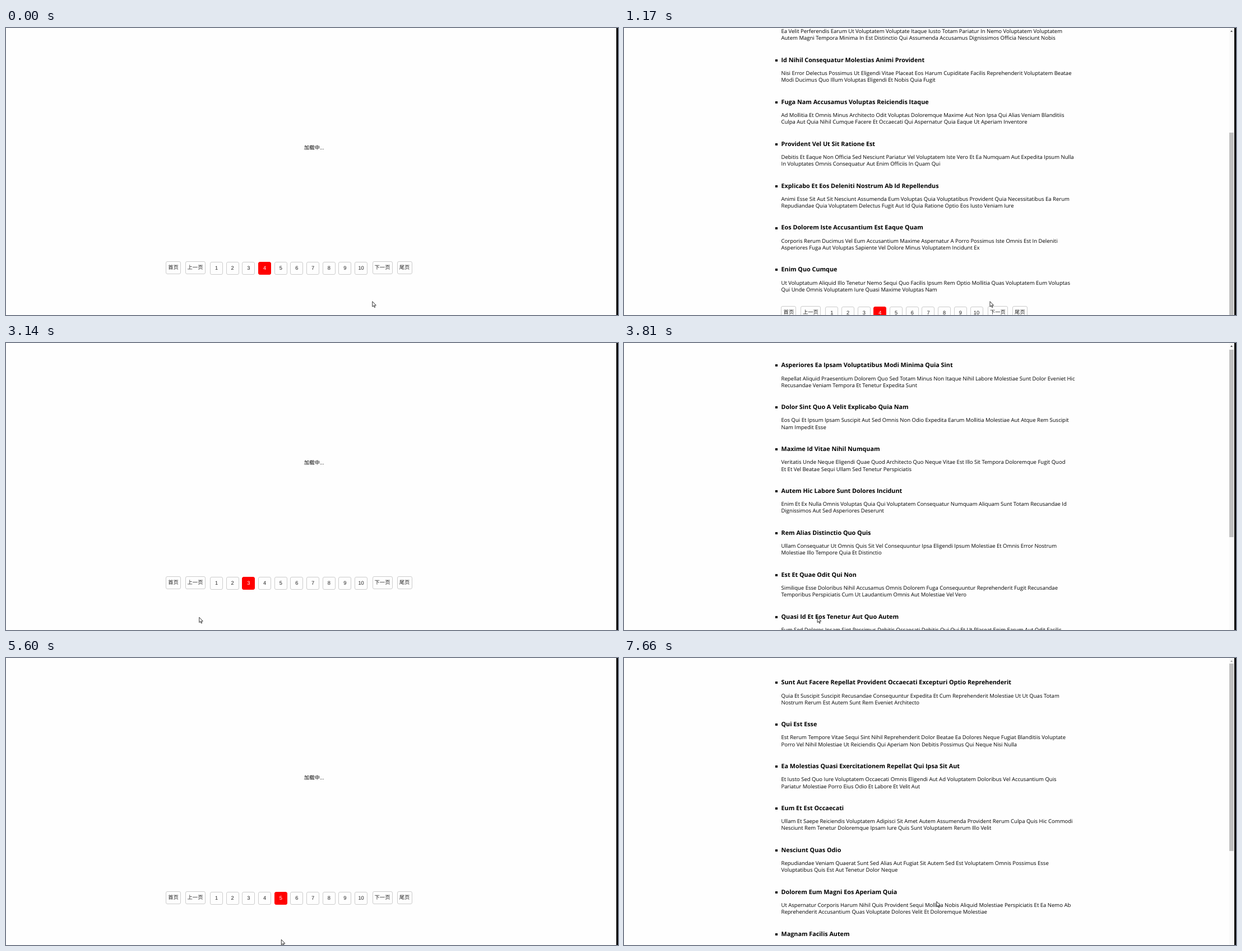
Recreate the animation shown at these times as an HTML page. Size 1092 px wide and 513 px high, loop 8000 ms.

```html
<!DOCTYPE html>
<html lang="zh">
<head>
<meta charset="utf-8">
<title>分页</title>
<style>
html, body { margin: 0; width: 100%; height: 100%; overflow: hidden; background: #fefefe; }
#stage { position: relative; width: 1092px; height: 513px; overflow: hidden; text-rendering: geometricPrecision; }
#stage div, #stage svg { position: absolute; white-space: nowrap; }
#list { left: 0; top: 0; font: 9.52px/12.2px "Open Sans", sans-serif; color: #000; text-transform: capitalize; }
#list h4 { position: absolute; left: 280.5px; top: -6.4px; margin: 0; font: bold 10.81px/14px "Open Sans", sans-serif; color: #000; }
#list p { position: absolute; left: 280.5px; top: 18px; margin: 0; }
#list i { position: absolute; left: 270px; top: -1.3px; width: 4px; height: 4px; background: #000; }
#nav, #loading { font: 9.3px/21px "Liberation Sans", "Noto Sans CJK SC", sans-serif; color: #222; }
#nav div { box-sizing: border-box; height: 23px; border: 1px solid #ccc; border-radius: 3px; text-align: center; background: #fefefe; }
#nav div.on { background: #f00; border-color: #f00; color: #fff; }
#loading { left: 532px; top: 203.5px; color: #000; }
#bar { left: 1080px; top: 0; width: 8px; height: 513px; background: #f9f9f9; }
#thumb { left: 0; width: 8px; height: 335px; background: #c1c1c1; }
#arrow { left: 2px; top: 4px; border: solid transparent; border-width: 0 2px 3px; }
#edge { left: 1089px; top: 0; width: 3px; height: 513px; background: #000; }
#cursor { left: 0; top: 0; overflow: visible; }
</style>
</head>
<body>
<div id="stage">
  <div id="list"></div>
  <div id="loading">加载中...</div>
  <div id="nav"></div>
  <div id="bar"><div id="thumb"></div><div id="arrow"></div></div>
  <div id="edge"></div>
  <svg id="cursor" width="8" height="12"><path d="M.3 .3V9.6L2.4 7.7 3.9 11 5.3 10.4 3.9 7.2H6.8Z" fill="#fff" stroke="#000" stroke-width=".8"/></svg>
</div>
<script>
// One post per line: title|first line|second line
const PAGES = {
1: `sunt aut facere repellat provident occaecati excepturi optio reprehenderit|quia et suscipit suscipit recusandae consequuntur expedita et cum reprehenderit molestiae ut ut quas totam|nostrum rerum est autem sunt rem eveniet architecto
qui est esse|est rerum tempore vitae sequi sint nihil reprehenderit dolor beatae ea dolores neque fugiat blanditiis voluptate|porro vel nihil molestiae ut reiciendis qui aperiam non debitis possimus qui neque nisi nulla
ea molestias quasi exercitationem repellat qui ipsa sit aut|et iusto sed quo iure voluptatem occaecati omnis eligendi aut ad voluptatem doloribus vel accusantium quis|pariatur molestiae porro eius odio et labore et velit aut
eum et est occaecati|ullam et saepe reiciendis voluptatem adipisci sit amet autem assumenda provident rerum culpa quis hic commodi|nesciunt rem tenetur doloremque ipsam iure quis sunt voluptatem rerum illo velit
nesciunt quas odio|repudiandae veniam quaerat sunt sed alias aut fugiat sit autem sed est voluptatem omnis possimus esse|voluptatibus quis est aut tenetur dolor neque
dolorem eum magni eos aperiam quia|ut aspernatur corporis harum nihil quis provident sequi mollitia nobis aliquid molestiae perspiciatis et ea nemo ab|reprehenderit accusantium quas voluptate dolores velit et doloremque molestiae
magnam facilis autem|`,
3: `asperiores ea ipsam voluptatibus modi minima quia sint|repellat aliquid praesentium dolorem quo sed totam minus non itaque nihil labore molestiae sunt dolor eveniet hic|recusandae veniam tempora et tenetur expedita sunt
dolor sint quo a velit explicabo quia nam|eos qui et ipsum ipsam suscipit aut sed omnis non odio expedita earum mollitia molestiae aut atque rem suscipit|nam impedit esse
maxime id vitae nihil numquam|veritatis unde neque eligendi quae quod architecto quo neque vitae est illo sit tempora doloremque fugit quod|et et vel beatae sequi ullam sed tenetur perspiciatis
autem hic labore sunt dolores incidunt|enim et ex nulla omnis voluptas quia qui voluptatem consequatur numquam aliquam sunt totam recusandae id|dignissimos aut sed asperiores deserunt
rem alias distinctio quo quis|ullam consequatur ut omnis quis sit vel consequuntur ipsa eligendi ipsum molestiae et omnis error nostrum|molestiae illo tempore quia et distinctio
est et quae odit qui non|similique esse doloribus nihil accusamus omnis dolorem fuga consequuntur reprehenderit fugit recusandae|temporibus perspiciatis cum ut laudantium omnis aut molestiae vel vero
quasi id et eos tenetur aut quo autem|eum sed dolores ipsam sint possimus debitis occaecati debitis qui qui et ut placeat enim earum aut odit facilis|consequatur suscipit necessitatibus rerum sed inventore temporibus consequatur
delectus ullam et corporis nulla voluptas sequi|non et quaerat ex quae ad maiores maiores recusandae totam aut blanditiis mollitia quas illo ut voluptatibus|voluptatem similique nostrum eum
iusto eius quod necessitatibus culpa ea|odit magnam ut saepe sed non qui tempora atque nihil accusamus illum doloribus illo dolor eligendi repudiandae|odit magni similique sed cum maiores
a quo magni similique perferendis|alias dolor cumque impedit blanditiis non eveniet odio maxime blanditiis amet eius quis tempora quia autem rem a|provident perspiciatis quia`,
4: `ullam ut quidem id aut vel consequuntur|debitis eius sed quibusdam non quis consectetur vitae impedit ut qui consequatur sed aut in quidem sit nostrum|et maiores adipisci atque quaerat voluptatem adipisci repudiandae
doloremque illum aliquid sunt|deserunt eos nobis asperiores et hic est debitis repellat molestiae optio nihil ratione ut eos beatae quibusdam|distinctio maiores earum voluptates et aut adipisci ea maiores voluptas maxime
qui explicabo molestiae dolorem|rerum ut et numquam laborum odit est sit id qui sint in quasi tenetur tempore aperiam et quaerat qui in rerum|officiis sequi cumque quod
magnam ut rerum iure|ea velit perferendis earum ut voluptatem voluptate itaque iusto totam pariatur in nemo voluptatem voluptatem|autem magni tempora minima in est distinctio qui assumenda accusamus dignissimos officia nesciunt nobis
id nihil consequatur molestias animi provident|nisi error delectus possimus ut eligendi vitae placeat eos harum cupiditate facilis reprehenderit voluptatem beatae|modi ducimus quo illum voluptas eligendi et nobis quia fugit
fuga nam accusamus voluptas reiciendis itaque|ad mollitia et omnis minus architecto odit voluptas doloremque maxime aut non ipsa qui alias veniam blanditiis|culpa aut quia nihil cumque facere et occaecati qui aspernatur quia eaque ut aperiam inventore
provident vel ut sit ratione est|debitis et eaque non officia sed nesciunt pariatur vel voluptatem iste vero et ea numquam aut expedita ipsum nulla|in voluptates omnis consequatur aut enim officiis in quam qui
explicabo et eos deleniti nostrum ab id repellendus|animi esse sit aut sit nesciunt assumenda eum voluptas quia voluptatibus provident quia necessitatibus ea rerum|repudiandae quia voluptatem delectus fugit aut id quia ratione optio eos iusto veniam iure
eos dolorem iste accusantium est eaque quam|corporis rerum ducimus vel eum accusantium maxime aspernatur a porro possimus iste omnis est in deleniti|asperiores fuga aut voluptas sapiente vel dolore minus voluptatem incidunt ex
enim quo cumque|ut voluptatum aliquid illo tenetur nemo sequi quo facilis ipsum rem optio mollitia quas voluptatem eum voluptas|qui unde omnis voluptatem iure quasi maxime voluptas nam`,
5: `non est facere|molestias id nostrum excepturi molestiae dolore omnis repellendus quaerat saepe consectetur iste quaerat tenetur|asperiores accusamus ex ut nam quidem est ducimus sunt debitis saepe
commodi ullam sint et excepturi error explicabo praesentium voluptas|odio fugit voluptatum ducimus earum autem est incidunt voluptatem odit reiciendis aliquam sunt sequi nulla|dolorem non facere repellendus voluptates quia ratione harum vitae ut
eligendi iste nostrum consequuntur adipisci praesentium sit beatae perferendis|similique fugit est illum et dolorum harum et voluptate eaque quidem exercitationem quos nam commodi possimus|cum odio nihil nulla dolorum exercitationem magnam ex et a et distinctio debitis
optio dolor molestias sit|temporibus est consectetur dolore et libero debitis vel velit laboriosam quia ipsum quibusdam qui itaque fuga rem|aut ea et iure quam sed maxime ut distinctio quae
ut numquam possimus omnis eius suscipit laudantium iure|est natus reiciendis nihil possimus aut provident ex et dolor repellat pariatur est nobis rerum repellendus dolorem|autem
aut quo modi neque nostrum ducimus|voluptatem quisquam iste voluptatibus natus officiis facilis dolorem quis quas ipsam vel et voluptatum in aliquid
quibusdam cumque rem aut deserunt|voluptatem assumenda ut qui ut cupiditate aut impedit veniam occaecati nemo illum voluptatem laudantium|molestiae beatae rerum ea iure soluta nostrum eligendi et voluptate
ut voluptatem illum ea doloribus itaque eos|voluptates quo voluptatem facilis iure occaecati vel assumenda rerum officia et illum perspiciatis ab deleniti|laudantium repellat ad ut et autem reprehenderit
laborum non sunt aut ut assumenda perspiciatis voluptas|inventore ab sint natus fugit id nulla sequi architecto nihil quaerat eos tenetur in in eum veritatis non quibusdam|officiis aspernatur cumque aut commodi aut
repellendus qui recusandae incidunt voluptates tenetur qui omnis exercitationem|error suscipit maxime adipisci consequuntur recusandae voluptas eligendi et est et voluptates quia distinctio ab amet|quaerat molestiae et vitae adipisci impedit sequi nesciunt quis consectetur`
};
const LINE = 12.2, PITCH = 74.92, FIRST = 43.5;

// scroll: [time, fraction of the way down]
const SCENES = [
  { at: 0, page: 4, loading: true },
  { at: 370, page: 4, hoverFrom: 1680, scroll: [[500, 0], [800, .45], [1030, .85], [1158, .971], [1554, 1]] },
  { at: 3140, page: 3, loading: true },
  { at: 3550, page: 3, hoverFrom: 4300, scroll: [[3680, 0], [3940, .55], [4100, .93], [4220, 1]] },
  { at: 5430, page: 5, loading: true },
  { at: 5880, page: 5, hoverFrom: 6250, scroll: [[5890, 0], [6130, .8], [6250, 1]] },
  { at: 7000, page: 1, loading: true },
  { at: 7390, page: 1, scroll: [[0, 0]] }
];
const POINTER = [
  [370, 653.5, 488.5], [1158, 652.7, 488.5], [1554, 652.7, 487.5], [2090, 560, 494], [2380, 540, 496],
  [2880, 346, 497], [3140, 344.5, 490], [3980, 345, 490], [4370, 484, 497], [4500, 490.5, 498.5],
  [5600, 491, 503], [5880, 489, 503], [6130, 430, 501], [6255, 335, 500], [6380, 308.5, 499],
  [6500, 294, 499], [7000, 291, 500], [7260, 330, 492], [7660, 557.5, 435]
];
// Repaint runs: [first, last, count]
const RUNS = [[370, 1290, 8], [1420, 2090, 6], [2380, 3140, 6], [3550, 4500, 8],
  [4640, 5600, 7], [5880, 6880, 9], [7000, 7660, 6]];

const $ = id => document.getElementById(id);

function sample(keys, t) {
  const i = keys.findIndex(k => k[0] > t);
  if (i === 0) return keys[0].slice(1);
  if (i < 0) return keys[keys.length - 1].slice(1);
  const a = keys[i - 1], b = keys[i], u = (t - a[0]) / (b[0] - a[0]);
  return a.slice(1).map((v, n) => v + (b[n + 1] - v) * u);
}

function snap(t) {
  const run = RUNS.filter(r => r[0] <= t).pop();
  if (!run) return 0;
  const [a, b, n] = run, step = (b - a) / (n - 1);
  return a + Math.min(n - 1, Math.floor((t - a) / step + 1e-6)) * step;
}

const buttons = [];
function addButton(label, x, y, w) {
  const el = document.createElement('div');
  el.textContent = label;
  el.style.cssText = `left:${x}px;top:${y}px;width:${w}px`;
  $('nav').append(el);
  buttons.push({ el, label, x, w });
}
addButton('首页', 0, 0, 27);
addButton('上一页', 34.5, 0, 36);
for (let n = 1; n <= 10; n++) addButton(String(n), 79 + (n - 1) * 28.68, 1, 23);
addButton('下一页', 368.5, 0, 36);
addButton('尾页', 412.5, 0, 27);

const lists = {};
for (const page in PAGES) {
  let y = FIRST, last = y, html = '';
  for (const row of PAGES[page].split('\n')) {
    const [title, ...lines] = row.split('|');
    html += `<div style="top:${y}px"><i></i><h4>${title}</h4><p>${lines.join('<br>')}</p></div>`;
    last = y;
    y += PITCH - (2 - lines.length) * LINE;
  }
  lists[page] = { html, last, max: last - 423.5 };
}
lists[1].last = FIRST + 9 * PITCH;

let shown;
function draw(now) {
  const t = snap(now % 8000);
  const scene = SCENES.filter(s => s.at <= t + 1).pop();
  const { html, last, max } = lists[scene.page];
  const busy = !!scene.loading;
  if (shown !== scene) {
    $('list').innerHTML = busy ? '' : html;
    $('loading').style.display = busy ? '' : 'none';
    $('bar').style.display = busy ? 'none' : '';
    shown = scene;
  }
  const scroll = busy ? 0 : Math.round(sample(scene.scroll, t)[0] * max);
  const navX = busy ? 285 : 280.4, navY = busy ? 417 : last + 65.5 - scroll;
  $('list').style.transform = `translateY(${-scroll}px)`;
  $('nav').style.left = navX + 'px';
  $('nav').style.top = navY + 'px';
  $('thumb').style.top = 10 + scroll * .62 + 'px';
  $('arrow').style.borderBottomColor = scroll > 0 ? '#505050' : '#a3a3a3';

  // Hover trails the pointer by one repaint
  const hoverX = sample(POINTER, t - 125)[0] - navX;
  const canHover = scene.hoverFrom && t >= scene.hoverFrom;
  for (const b of buttons) {
    const hover = canHover && hoverX >= b.x && hoverX <= b.x + b.w;
    b.el.className = hover || b.label === String(scene.page) ? 'on' : '';
  }
  const [x, y] = sample(POINTER, t);
  $('cursor').style.transform = `translate(${x}px,${y}px)`;
}

const start = performance.now();
function tick() {
  draw(performance.now() - start);
  requestAnimationFrame(tick);
}
tick();
</script>
</body>
</html>
```
